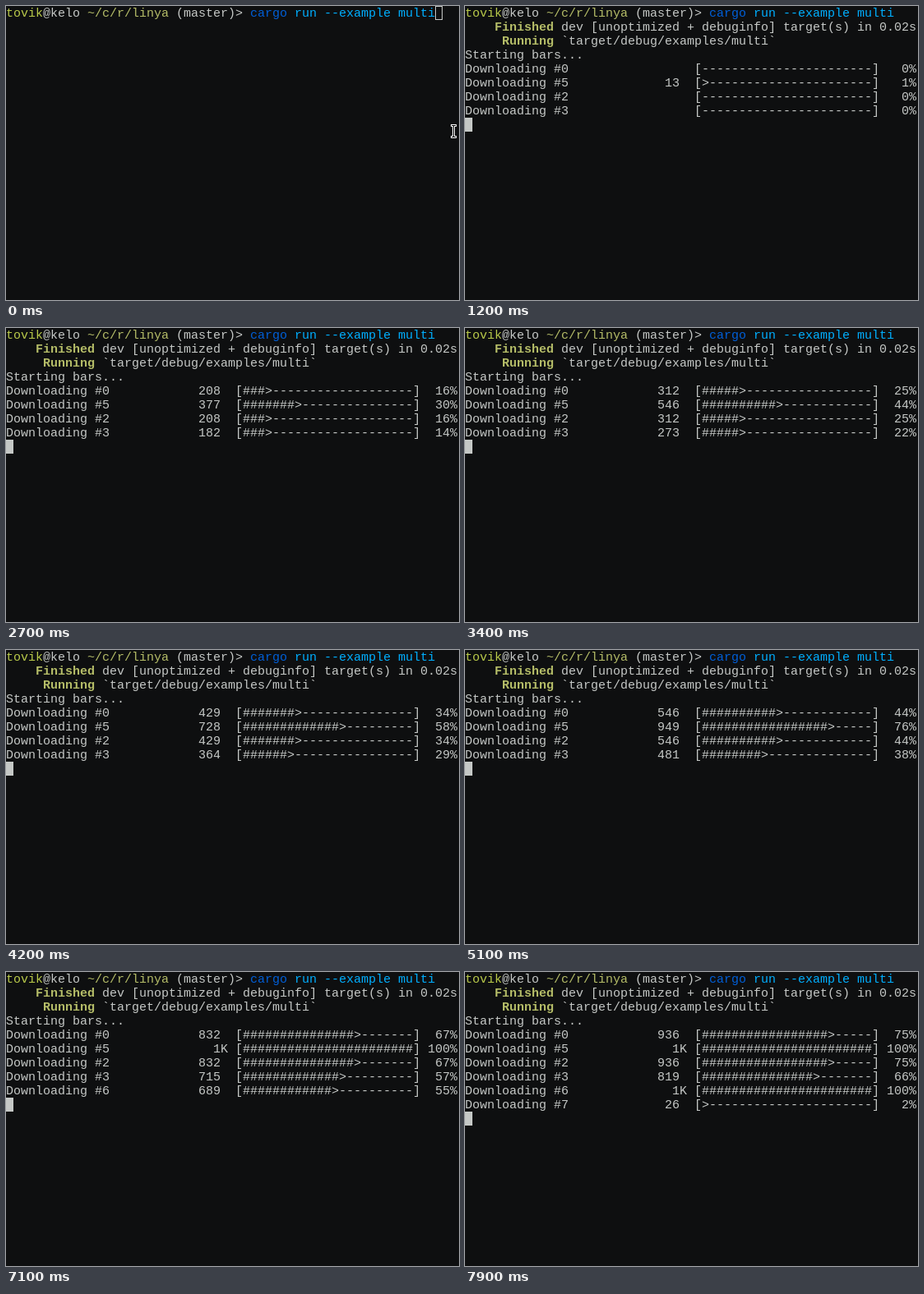
Recreate the animation shown at these times as an HTML page with a canvas. Size 551x358 px, loop 8 s.

```html
<!DOCTYPE html>
<html lang="en">
<head>
<meta charset="utf-8">
<title>Terminal progress bars</title>
<style>
  html, body { margin: 0; width: 100%; height: 100%; overflow: hidden; background: #0e0f10; }
  canvas { display: block; }
</style>
</head>
<body>
<canvas id="screen" width="551" height="358"></canvas>
<script>
const ctx = document.getElementById('screen').getContext('2d');
const LOOP = 8000, TICK = 100;
const CELL_W = 9, CELL_H = 17, BASELINE = 13;
const FONT = '15px "Liberation Mono", monospace';
const BG = '#0e0f10', FG = '#c5c8c6', GREEN = '#b5bd68', LIME = '#b9ca4a',
      BLUE = '#005fd7', SKY = '#00afff';

// Each bar redraws whenever it has gained CHUNK units; pace is ms per chunk.
const TOTAL = 1237, CHUNK = 13, BAR_W = 23;
const ENTER = 1100;
const bars = [
  { id: 0, start: 1125, pace: 93 },
  { id: 5, start: 1125, pace: 54 },
  { id: 2, start: 1125, pace: 93 },
  { id: 3, start: 1125, pace: 107 },
  { id: 6, start: 6290, pace: 15.2 },
  { id: 7, start: 7740, pace: 67 }
];

function write(col, row, text, color = FG, bold = false) {
  ctx.font = (bold ? 'bold ' : '') + FONT;
  ctx.fillStyle = color;
  [...text].forEach((ch, i) => {
    if (ch !== ' ') ctx.fillText(ch, (col + i) * CELL_W, row * CELL_H + BASELINE);
  });
}

function box(color, x, y, w, h) {
  ctx.fillStyle = color;
  ctx.fillRect(x, y, w, h);
}

function cursor(col, row, hollow) {
  const x = col * CELL_W, y = row * CELL_H;
  box(FG, x, y, CELL_W, CELL_H);
  if (hollow) box(BG, x + 1, y + 1, CELL_W - 2, CELL_H - 2);
}

function pointer(x, y) {
  box('#fff', x - 3, y, 7, 3);
  box('#fff', x - 1, y, 3, 17);
  box('#fff', x - 3, y + 14, 7, 3);
  box('#000', x - 2, y + 1, 5, 1);
  box('#000', x, y + 1, 1, 15);
  box('#000', x - 2, y + 15, 5, 1);
}

function prompt() {
  write(0, 0, 'tovik', LIME);
  write(5, 0, '@kelo');
  write(11, 0, '~/c/r/linya', GREEN);
  write(23, 0, '(master)>');
  write(33, 0, 'cargo', BLUE);
  write(39, 0, 'run --example multi', SKY);
}

function header() {
  write(4, 1, 'Finished', GREEN, true);
  write(13, 1, 'dev [unoptimized + debuginfo] target(s) in 0.02s');
  write(5, 2, 'Running', GREEN, true);
  write(13, 2, '`target/debug/examples/multi`');
  write(0, 3, 'Starting bars...');
}

function barLine(bar, t) {
  const steps = Math.floor((t - bar.start) / bar.pace);
  const done = steps >= Math.floor(TOTAL / CHUNK);
  const value = done ? TOTAL : steps * CHUNK;
  const size = value === 0 ? '' : value < 1000 ? value + ' ' : '1K';
  const filled = Math.floor(value * BAR_W / TOTAL);
  const head = value > 0 && !done ? '>' : '';
  const meter = ('#'.repeat(filled) + head).padEnd(BAR_W, '-');
  const percent = String(Math.floor(value * 100 / TOTAL)).padStart(3);
  return `Downloading #${bar.id}${size.padStart(16)} [${meter}] ${percent}%`;
}

function draw(t) {
  box(BG, 0, 0, 551, 358);
  prompt();
  if (t < ENTER) {
    cursor(58, 0, t < 200);
    if (t < 400) pointer(t < 300 ? 544 : 546, 144);
    return;
  }
  header();
  const shown = bars.filter(bar => t >= bar.start);
  shown.forEach((bar, i) => write(0, 4 + i, barLine(bar, t)));
  cursor(0, 4 + shown.length, false);
}

const origin = performance.now();
function frame() {
  const t = (performance.now() - origin) % LOOP;
  draw(Math.floor(t / TICK) * TICK);
  requestAnimationFrame(frame);
}
frame();
</script>
</body>
</html>
```
